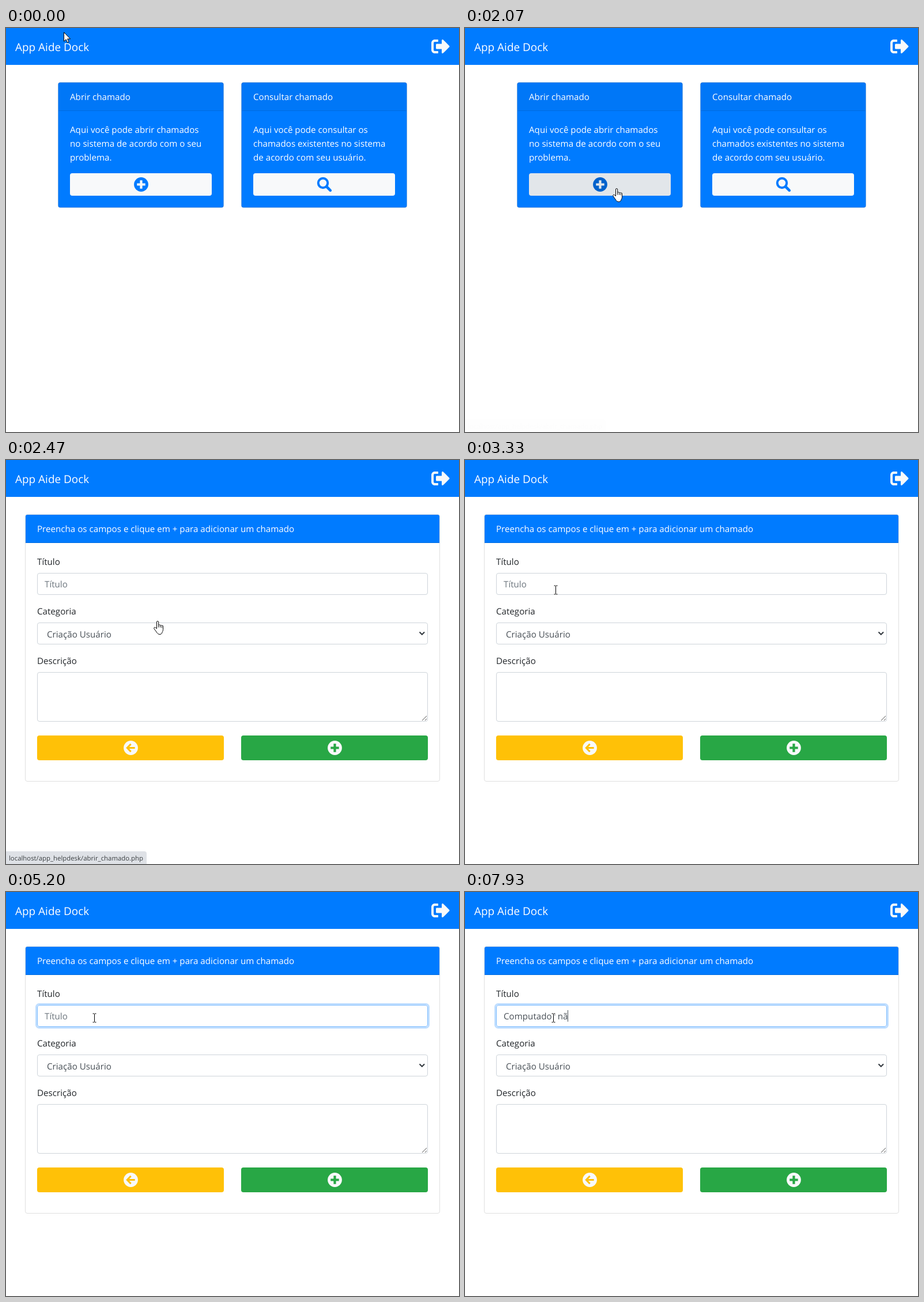
An HTML page for the animation above (8000 ms loop, 786 by 701 pixels).

```html
<!DOCTYPE html>
<html lang="pt-BR">
<head>
<meta charset="utf-8">
<title>Chamados</title>
<style>
html, body { margin: 0; width: 100%; height: 100%; overflow: hidden; background: #fff; }
svg { display: block; width: 786px; height: 701px; }
text { font-family: "Open Sans", "Noto Sans", sans-serif; white-space: pre; text-rendering: geometricPrecision; }
</style>
</head>
<body>
<svg id="stage" viewBox="0 0 786 701" xmlns="http://www.w3.org/2000/svg"></svg>
<script>
const LOOP = 8000, STEP = 200 / 3;
const BLUE = '#007bff', LIGHT = '#f8f9fa', INK = '#212529', FIELD = '#495057', EDGE = 'rgba(0,0,0,.125)';

// Markup helpers
const rect = (x, y, w, h, fill, r = 0, extra = '') =>
  `<rect x="${x}" y="${y}" width="${w}" height="${h}" rx="${r}" fill="${fill}" ${extra}/>`;
const box = (x, y, w, h, fill, stroke, extra = '') =>
  rect(x + .5, y + .5, w - 1, h - 1, fill, 3.5, `stroke="${stroke}" ${extra}`);
const text = (x, y, s, fill, size = 16, id = '') =>
  `<text x="${x}" y="${y}" fill="${fill}" font-size="${size * .948}" id="${id}">${s}</text>`;
const line = (d, color, width, extra = '') =>
  `<path d="${d}" fill="none" stroke="${color}" stroke-width="${width}" ${extra}/>`;
const at = (x, y, body, id = '') => `<g id="${id}" transform="translate(${x} ${y})">${body}</g>`;
const disc = (color, glyph, id = '') => `<circle r="12.4" fill="${color}" id="${id}"/>` + glyph;
const cross = (color, id = '') => line('M-7.2 0H7.2M0-7.2V7.2', color, 4.2, `id="${id}"`);

const card = (x, title, lines) =>
  box(x, 94, 288, 218, BLUE, EDGE) +
  rect(x + 1, 95, 286, 48, 'rgba(0,0,0,.03)', 3) +
  rect(x + 1, 143, 286, 1, EDGE) +
  text(x + 21, 125, title, '#fff') +
  lines.map((s, i) => text(x + 21, 182 + i * 24, s, '#fff')).join('');

const nav = rect(0, 0, 786, 64, BLUE) + text(16, 40, 'App Aide Dock', '#fff', 20) +
  at(738, 16, `<g fill="${LIGHT}">
    <path d="M31.1 17.1L20.6 27.6c-1 1-2.6.3-2.6-1.1v-6H9.5c-.8 0-1.5-.7-1.5-1.5v-6c0-.8.7-1.5 1.5-1.5H18v-6c0-1.3 1.6-2 2.6-1.1l10.5 10.5c.6.6.6 1.5 0 2.2z"/>
    <path d="M12 27.2v-2.4c0-.5-.3-.8-.8-.8H6c-1.1 0-2-.9-2-2V10c0-1.1.9-2 2-2h5.2c.5 0 .8-.3.8-.8V4.8c0-.5-.3-.8-.8-.8H6c-3.3 0-6 2.7-6 6v12c0 3.3 2.7 6 6 6h5.2c.5 0 .8-.3.8-.8z"/></g>`);

const home =
  card(90, 'Abrir chamado', ['Aqui você pode abrir chamados', 'no sistema de acordo com o seu', 'problema.']) +
  card(408, 'Consultar chamado', ['Aqui você pode consultar os', 'chamados existentes no sistema', 'de acordo com seu usuário.']) +
  rect(0, 0, 0, 0, 'none', 5, 'id="openRing" stroke="rgba(216,217,219,.5)"') +
  rect(111, 252, 246, 39, LIGHT, 4, 'id="open"') +
  at(234.5, 271.5, disc(BLUE, cross(LIGHT, 'openCross'), 'openDisc')) +
  rect(429, 252, 246, 39, LIGHT, 4) +
  at(552, 271, `<circle cx="-2" cy="-2" r="8.2" fill="none" stroke="${BLUE}" stroke-width="4"/>` +
    line('M4.5 4.5L10.8 10.8', BLUE, 4.6, 'stroke-linecap="round"'));

const form =
  box(33, 94, 720, 464, '#fff', '#dfdfdf') +
  `<path d="M34 144V98a3 3 0 0 1 3-3H749a3 3 0 0 1 3 3V144z" fill="${BLUE}"/>` +
  rect(34, 143, 718, 1, EDGE) +
  text(54, 125, 'Preencha os campos e clique em + para adicionar um chamado', '#fff') +
  text(54, 182, 'Título', INK) +
  rect(0, 0, 0, 0, 'none', 5, 'id="fieldRing" stroke="rgba(0,123,255,.25)"') +
  box(54, 196, 678, 38, '#fff', '#ced4da', 'id="field"') +
  text(67, 221, '', FIELD, 16, 'typed') +
  rect(67, 205, 1, 20, FIELD, 0, 'id="caret"') +
  text(54, 268, 'Categoria', INK) +
  box(54, 282, 678, 38, '#fff', '#ced4da') +
  text(71, 308, 'Criação Usuário', FIELD) +
  line('M717.5 298.5L721.8 302.8L726.1 298.5', '#343a40', 2) +
  text(54, 354, 'Descrição', INK) +
  box(54, 368, 678, 86, '#fff', '#ced4da') +
  line('M722 452L730 444M727 452L730 449', '#555', 1) +
  rect(54, 478, 324, 43, '#ffc107', 4) +
  at(216.5, 499.5, disc(LIGHT, line('M7.2 0H-5.5M.2-6.6L-6.2 0L.2 6.6', '#ffc107', 3))) +
  rect(408, 478, 324, 43, '#28a745', 4) +
  at(570.5, 499.5, disc(LIGHT, cross('#28a745')));

const status = '<path d="M0 679H240a4 4 0 0 1 4 4V701H0z" fill="#dee1e6"/>' +
  text(5, 695, 'localhost/app_helpdesk/abrir_chamado.php', '#3c4043', 12);

const beam = 'M-3-7.5H-.5M.5-7.5H3M0-7V7M-3 7.5H-.5M.5 7.5H3';
const pointers = {
  arrow: '<path d="M.5 .5V16.2L4.1 12.8L6.6 18.3L9 17.2L6.6 11.9H11.6z" fill="#fff" stroke="#000"/>',
  hand: `<g transform="translate(-6)" stroke="#000" stroke-linejoin="round">
    <path d="M5.5 13.5V2.2a1.6 1.6 0 0 1 3.2 0V7.6a1.6 1.6 0 0 1 2.9.5a1.5 1.5 0 0 1 2.6.6a1.3 1.3 0 0 1 2.3 1.2V15.5c0 2.5-1.5 3.6-1.9 5.6C14 22.7 12.500 23.500 11 23.500C8 23.500 6.800 22 5.500 20C4.200 18 2.500 16 1 13.800C0 12 1.900 10.600 3.300 11.700z" fill="#fff"/>
    <path d="M8.700 7.500V11.500M11.600 8.500V11.500M14.200 9.500V12" fill="none"/></g>`,
  beam: line(beam, '#fff', 3) + line(beam, '#000', 1)
};

const stage = document.getElementById('stage');
stage.innerHTML = nav + at(0, 0, home, 'home') + at(0, 0, form, 'form') + at(0, 0, status, 'status') +
  Object.keys(pointers).map(k => at(0, 0, pointers[k], k)).join('');

const el = id => document.getElementById(id);
const set = (id, attrs) => { for (const k in attrs) el(id).setAttribute(k, attrs[k]); };
const show = (id, on) => set(id, { visibility: on ? 'visible' : 'hidden' });
const ramp = (t, start, dur) => Math.min(1, Math.max(0, (t - start) / dur));
const ease = p => p * (2 - p);
const mix = (a, b, p) => `rgb(${a.map((v, i) => Math.round(v + (b[i] - v) * p))})`;

// Pointer path: step, x, y, easing power towards this point
const path = [
  [11, 100, 7, 1], [23, 226, 166, 1.25], [24, 237, 190, 1], [27, 255, 255, 1],
  [29, 262, 277, .7], [33, 262, 279, 1], [40, 262, 279, 1], [50, 157, 225, .8], [53, 153, 218, .8]
];
function pointerAt(step) {
  const i = path.findIndex(p => p[0] >= step);
  if (i < 0) return path[path.length - 1].slice(1, 3);
  if (i === 0) return path[0].slice(1, 3);
  const [s0, x0, y0] = path[i - 1], [s1, x1, y1, pow] = path[i];
  const p = ((step - s0) / (s1 - s0)) ** pow;
  return [x0 + (x1 - x0) * p, y0 + (y1 - y0) * p].map(Math.round);
}

const title = 'Computador nã';
const keys = [5470, 5600, 5800, 6000, 6270, 6330, 6470, 6600, 6730, 6870, 6930, 7270, 7930];
const FOCUS = 3570, BLINK = 533;

function ring(id, x, y, w, h, size) {
  set(id, { x: x - size / 2, y: y - size / 2, width: w + size, height: h + size, 'stroke-width': size });
}

function draw(now) {
  const step = Math.floor((now + 5) / STEP), t = step * STEP + 1;
  const onForm = step >= 37;
  show('home', !onForm);
  show('form', onForm);

  const [x, y] = pointerAt(step);
  const kind = onForm ? (step <= 40 ? 'hand' : y < 234 ? 'beam' : 'arrow') : y >= 252 ? 'hand' : 'arrow';
  for (const k in pointers) show(k, k === kind);
  set(kind, { transform: `translate(${kind === 'beam' ? x + .5 : x} ${kind === 'beam' ? y + .5 : y})` });

  set('status', { opacity: ramp(t, 2066, 130) * (1 - ramp(t, 2930, 200)) });

  if (!onForm) {
    const hover = ease(ramp(t, 1760, 150)), press = ease(ramp(t, 2310, 150));
    const fill = press ? mix([226, 230, 234], [218, 224, 229], press) : mix([248, 249, 250], [226, 230, 234], hover);
    set('open', { fill });
    set('openCross', { stroke: fill });
    set('openDisc', { fill: mix([0, 123, 255], [0, 98, 204], hover) });
    ring('openRing', 111, 252, 246, 39, 2.4 * press);
    return;
  }

  const focus = ease(ramp(t, FOCUS, 150));
  ring('fieldRing', 54, 196, 678, 38, 3 * focus);
  set('field', { stroke: mix([206, 212, 218], [128, 189, 255], focus) });

  const count = keys.filter(k => k <= t + 4).length;
  const typed = el('typed');
  typed.textContent = count ? title.slice(0, count) : 'Título';
  typed.setAttribute('fill', count ? FIELD : '#6c757d');
  const since = t + 4 - (count ? keys[count - 1] : 3600);
  show('caret', since >= 0 && Math.floor(since / BLINK) % 2 === 0);
  set('caret', { x: count ? Math.floor(67 + typed.getComputedTextLength()) : 67 });
}

const begin = performance.now();
function tick() {
  draw((performance.now() - begin) % LOOP);
  requestAnimationFrame(tick);
}
draw(0);
requestAnimationFrame(tick);
</script>
</body>
</html>
```
